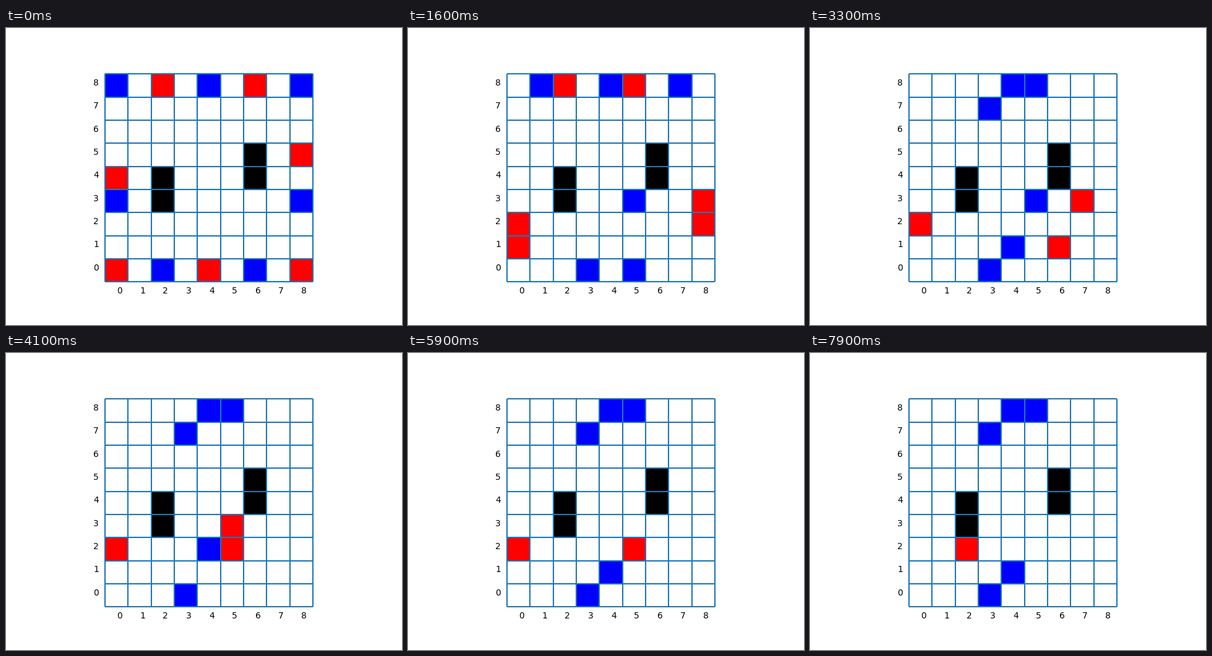
These frames come from a looping animation (640x480 px, 8000 ms). A matplotlib script:

```python
from itertools import chain, pairwise, zip_longest

import matplotlib.pyplot as plt
from matplotlib.animation import FuncAnimation
from matplotlib.patches import Rectangle

SIZE = 9
WALLS = [(2, 3), (2, 4), (6, 4), (6, 5)]

# each walk visits cells written as column and row
BLUE_WALKS = ["20 30", "60 50", "83 53", "03 02", "08 18", "88 58", "48 37",
              "18 48", "50 41", "41 42", "53 52",
              *["42 41 42"] * 2, "42 40", *["40 41 40"] * 2,
              "40 62 52 54 41"]
RED_WALKS = ["80 82", "85 83", "00 01", "04 02", "68 58", "01 11", "28 27",
             "82 61", "11 31", "83 63", "61 62", "63 53", "62 52 61",
             "53 47", "61 52 47", "02 22 12 22"]


def toward(a, b):
    return a + (b > a) - (b < a)


def steps(walk):
    """Yield single moves: along the row first, then along the column."""
    for start, goal in pairwise(walk.split()):
        (x, y), (gx, gy) = map(int, start), map(int, goal)
        if x == gx or y == gy or start != "40":
            order = "xy"
        else:
            order = "yx"
        while (x, y) != (gx, gy):
            old = x, y
            if y == gy or (order == "xy" and x != gx):
                x = toward(x, gx)
            elif order == "yx" and y < 1 or x == gx:
                y = toward(y, gy)
            else:
                x = toward(x, gx)
            yield old, (x, y)


def captured(board, cell):
    """A piece falls when two or more enemies stand beside it."""
    x, y = cell
    beside = [(x - 1, y), (x + 1, y), (x, y - 1), (x, y + 1)]
    return sum(board.get(c, board[cell]) != board[cell] for c in beside) >= 2


def play(board, move):
    old, new = move
    board = {new if c == old else c: color for c, color in board.items()}
    return {c: color for c, color in board.items() if not captured(board, c)}


def opening():
    board = {(0, 3): "blue", (8, 3): "blue", (0, 4): "red", (8, 5): "red"}
    for x in range(0, SIZE, 2):
        pair = ("red", "blue") if x % 4 == 0 else ("blue", "red")
        board[x, 0], board[x, SIZE - 1] = pair
    return board


# blue and red take turns
blue, red = (chain.from_iterable(map(steps, walks))
             for walks in (BLUE_WALKS, RED_WALKS))
boards = [opening()]
for move in chain.from_iterable(zip_longest(blue, red)):
    if move:
        boards.append(play(boards[-1], move))

fig, ax = plt.subplots(figsize=(6.4, 4.8), dpi=100)
fig.subplots_adjust(left=0.125, right=0.9, bottom=0.11, top=0.88)
ax.set_aspect("equal")
ax.axis("off")

cells = {(x, y): ax.add_patch(Rectangle((x, y), 1, 1, lw=0))
         for x in range(SIZE) for y in range(SIZE)}

line = dict(color="C0", lw=1.5, solid_capstyle="butt")
for i in range(SIZE + 1):
    ax.plot([0, SIZE], [i, i], **line)
    ax.plot([i, i], [0, SIZE], **line)
for i in range(SIZE):
    ax.text(i + 0.5, -0.5, str(i), fontsize=10, family="DejaVu Sans")
    ax.text(-0.5, i + 0.5, str(i), fontsize=10, family="DejaVu Sans")

margin = 0.05 * SIZE
ax.set_xlim(-margin, SIZE + margin)
ax.set_ylim(-margin, SIZE + margin)


def draw(n):
    for cell, patch in cells.items():
        empty = "black" if cell in WALLS else "white"
        patch.set_facecolor(boards[n].get(cell, empty))
    return list(cells.values())


anim = FuncAnimation(fig, draw, frames=len(boards), interval=100,
                     repeat=True, repeat_delay=0, blit=False)
plt.show()
```
